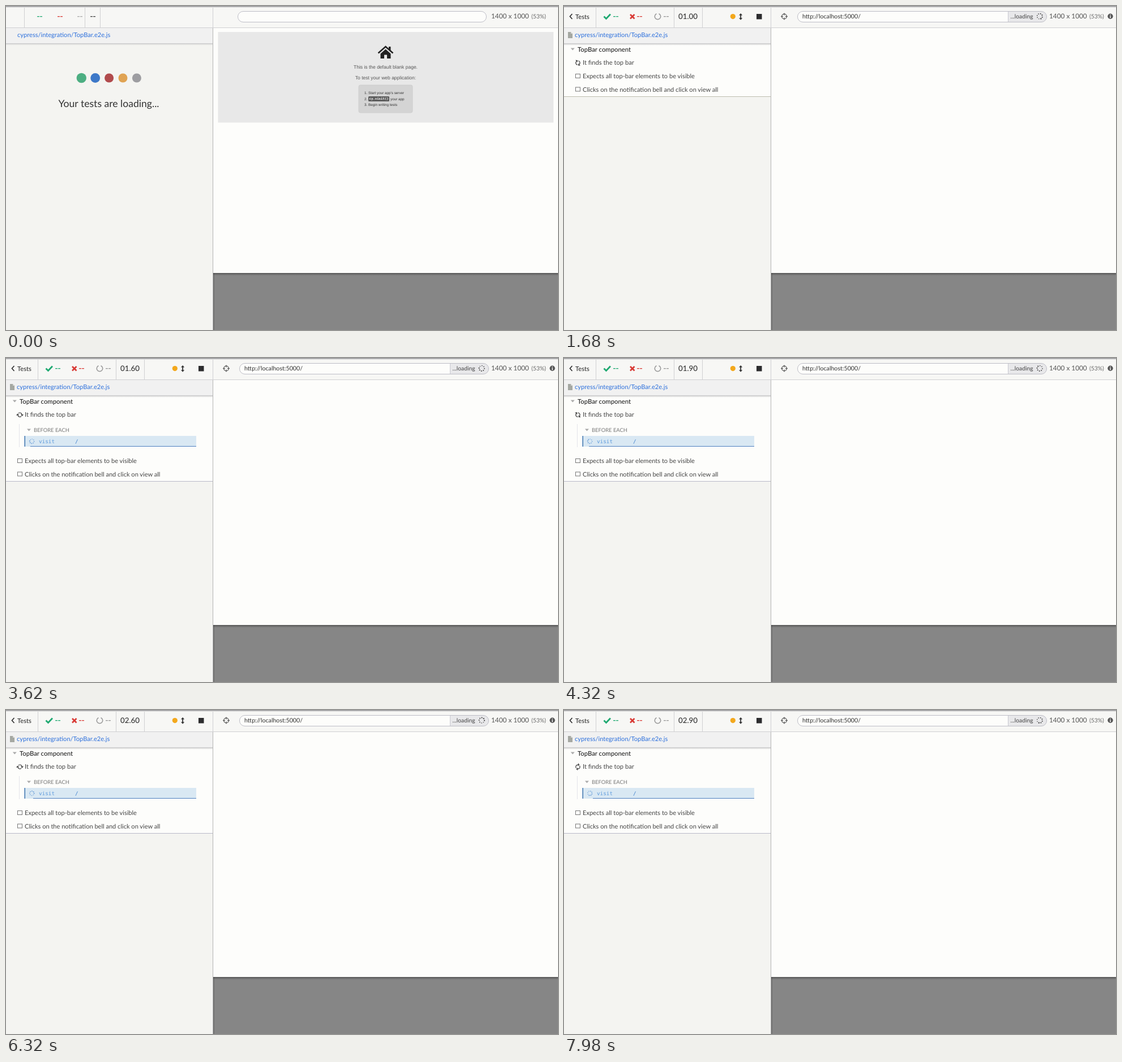
These frames come from a looping animation (975x574 px, 8000 ms). An HTML page with a canvas:

```html
<!DOCTYPE html>
<html lang="en">
<head>
<meta charset="utf-8">
<title>Test runner</title>
<style>
  html, body { margin: 0; width: 100%; height: 100%; overflow: hidden; background: #f4f4f1; }
  canvas { display: block; }
</style>
</head>
<body>
<canvas id="stage" width="975" height="574"></canvas>
<script>
const ctx = document.getElementById('stage').getContext('2d');
ctx.textRendering = 'geometricPrecision';
const LOOP = 8000;
const TAU = Math.PI * 2;
const LIST_AT = 6;      // tick at which the test list replaces the loader
const VISIT_AT = 40;    // tick at which the first command appears
const UI = 'Lato, sans-serif';
const PAGE = '"Liberation Sans", Arial, sans-serif';
const MONO = '"DejaVu Sans Mono", monospace';
const GREEN = '#1fa971', RED = '#d93a35', INK = '#333', LINE = '#cfcfd2', WHITE = '#fdfdfb';

// The picture advances in uneven steps: three ticks every 140 ms.
function tickAt(ms) {
  const p = ms % 140;
  return 3 * Math.floor(ms / 140) + (p < 20 ? 0 : p < 120 ? 1 : 2);
}

function rect(x, y, w, h, color) {
  ctx.fillStyle = color;
  ctx.fillRect(x, y, w, h);
}

function text(str, x, y, size, color, { font = UI, weight = 400, align = 'left' } = {}) {
  ctx.font = `${weight} ${size}px ${font}`;
  ctx.fillStyle = color;
  ctx.textAlign = align;
  ctx.fillText(str, x, y);
}

function dot(x, y, r, color) {
  ctx.fillStyle = color;
  ctx.beginPath();
  ctx.arc(x, y, r, 0, TAU);
  ctx.fill();
}

function ring(x, y, r, color, width, from = 0, to = TAU) {
  ctx.strokeStyle = color;
  ctx.lineWidth = width;
  ctx.beginPath();
  ctx.arc(x, y, r, from, to);
  ctx.stroke();
}

function path(points, color, width) {
  ctx.beginPath();
  points.forEach(([x, y], i) => i ? ctx.lineTo(x, y) : ctx.moveTo(x, y));
  if (width) {
    ctx.strokeStyle = color;
    ctx.lineWidth = width;
    ctx.stroke();
  } else {
    ctx.fillStyle = color;
    ctx.fill();
  }
}

function round(x, y, w, h, r, fill, stroke) {
  ctx.beginPath();
  ctx.roundRect(x, y, w, h, r);
  if (fill) {
    ctx.fillStyle = fill;
    ctx.fill();
  }
  if (stroke) {
    ctx.strokeStyle = stroke;
    ctx.lineWidth = 1;
    ctx.stroke();
  }
}

function fade(x, y, w, h, from, to) {
  const g = ctx.createLinearGradient(0, y, 0, y + h);
  g.addColorStop(0, from);
  g.addColorStop(1, to);
  rect(x, y, w, h, g);
}

function spinner(x, y, r, size, color, angle) {
  for (let i = 0; i < 8; i++) {
    const a = angle + i * TAU / 8;
    dot(x + r * Math.cos(a), y + r * Math.sin(a), size * (0.72 + i * 0.055), color);
  }
}

function syncIcon(x, y, angle) {
  ctx.save();
  ctx.translate(x, y);
  ctx.rotate(angle);
  for (let i = 0; i < 2; i++) {
    ring(0, 0, 3.6, '#444', 1.4, Math.PI * 1.06, Math.PI * 1.8);
    path([[4.8, -4.6], [4.8, -0.7], [1, -0.7]], '#444');
    ctx.rotate(Math.PI);
  }
  ctx.restore();
}

function caret(x, y) {
  path([[x - 3.5, y - 2], [x + 3.5, y - 2], [x, y + 2]], '#aaa');
}

function backdrop() {
  rect(0, 0, 975, 574, '#f4f4f1');
  rect(0, 0, 975, 38, '#f7f7f5');
  fade(0, 0, 975, 3, '#86868a', '#f7f7f5');
  rect(0, 38, 975, 1, LINE);
  rect(366, 39, 609, 434, WHITE);
  rect(366, 473, 609, 101, '#868686');
  fade(366, 473, 609, 5, 'rgba(55,55,55,.7)', 'rgba(90,90,90,0)');
  rect(366, 473, 2, 101, 'rgba(60,60,60,.3)');
  rect(365, 39, 1, 535, '#b4b4b4');
}

function fileStrip(listed) {
  rect(0, 39, 365, 27, '#f1f1f1');
  fade(0, 66, 365, 4, '#c2c2c4', 'rgba(220,220,220,0)');
  if (listed) {
    path([[7, 46], [12, 46], [15, 49], [15, 57], [7, 57]], '#a5a8a2');
    path([[12, 46], [12, 49], [15, 49]], '#dcdcda');
  }
  text('cypress/integration/TopBar.e2e.js', listed ? 19 : 20, 55, 11.1, '#2b6fdc');
}

function dashes(x, color) {
  rect(x, 18, 4, 1.3, color);
  rect(x + 5, 18, 4, 1.3, color);
}

function viewportSize() {
  text('1400 x 1000', 857, 22, 11.8, '#555');
  text('(53%)', 928, 22, 10.3, '#666');
}

function loaderBar() {
  for (const x of [32, 139, 166, 365]) rect(x, 3, 1, 35, LINE);
  dashes(55, GREEN);
  dashes(91, RED);
  dashes(126, '#aaa');
  dashes(149, '#444');
  round(409.5, 9.5, 439, 19, 9.5, WHITE, '#bdbdc6');
  viewportSize();
}

function loader(tick) {
  ['#4cae82', '#3d78c8', '#b14b4d', '#e0a353', '#9d9da1'].forEach((color, i) => {
    const pulse = Math.max(0, Math.cos(tick / 60 * TAU - i * 0.9));
    dot(133.3 + i * 24.4, 127.5, 8 + 0.7 * pulse, color);
  });
  text('Your tests are loading...', 181.5, 179, 17.6, INK, { align: 'center' });
}

function blankPage() {
  rect(374.5, 46, 592.5, 160.5, '#e8e8e8');
  // House: roof, chimney, body with door
  path([[657.5, 83.5], [670.5, 72], [683.5, 83.5]], '#222', 2.6);
  path([[676, 72], [679.5, 72], [679.5, 80], [676, 77]], '#222');
  path([[661.5, 84.5], [670.5, 76.5], [679.5, 84.5], [679.5, 93], [673, 93],
        [673, 86.5], [668, 86.5], [668, 93], [661.5, 93]], '#222');
  const centred = { font: PAGE, align: 'center' };
  text('This is the default blank page.', 670.5, 110.5, 8.5, '#555', centred);
  text('To test your web application:', 670.5, 130, 8.5, '#555', centred);
  round(623, 140, 95, 49, 3, '#d4d4d4', '#cecece');
  const item = { font: PAGE };
  ['1.', '2.', '3.'].forEach((s, i) => text(s, 633, 156.3 + i * 10.2, 6.3, INK, item));
  text("Start your app's server", 640, 156.3, 6.3, INK, item);
  round(640, 160, 37, 9, 1.5, '#5c5c5c');
  text('cy.visit()', 641.5, 166.4, 5.7, '#fff', { font: MONO, weight: 700 });
  text('your app', 679, 166.5, 6.3, INK, item);
  text('Begin writing tests', 640, 176.7, 6.3, INK, item);
}

function runBar(tick) {
  for (const x of [56, 194, 244, 365]) rect(x, 3, 1, 35, LINE);
  path([[14.5, 14], [10.5, 18.5], [14.5, 23]], INK, 1.7);
  text('Tests', 20, 22.5, 11.2, INK, { weight: 500 });
  path([[70.5, 18.5], [74.5, 22.5], [82, 14.5]], GREEN, 2.8);
  dashes(87, GREEN);
  path([[117, 15], [124.5, 22.5]], RED, 2.6);
  path([[124.5, 15], [117, 22.5]], RED, 2.6);
  dashes(129, RED);
  ring(165.5, 18.5, 5.2, '#999', 1.5, -TAU / 4 + 0.4, TAU * 0.75 - 0.4);
  dashes(176, '#999');

  const tenths = Math.min(29, Math.floor(tick / 6 + 4 + 1e-6));
  text('0' + (tenths / 10).toFixed(2), 202, 23, 13.3, INK, { weight: 500 });

  dot(298.3, 18.6, 4.6, '#f3a81c');
  rect(311.2, 15, 1.8, 8, INK);
  path([[309, 16.5], [312.1, 13], [315.2, 16.5]], INK);
  path([[309, 21.2], [312.1, 24.7], [315.2, 21.2]], INK);
  rect(340, 14, 9.5, 9.5, '#2c2c2e');

  ring(389, 18.5, 4.3, '#555', 1.2);
  for (const [x, y, w, h] of [[388.4, 12.5, 1.2, 4], [388.4, 20.5, 1.2, 4],
                             [383, 17.9, 4, 1.2], [391, 17.9, 4, 1.2]]) rect(x, y, w, h, '#555');

  round(412.5, 9.5, 440, 19, 9.5, WHITE);
  round(784, 9.5, 68.5, 19, [0, 9.5, 9.5, 0], '#e8e8ea');
  rect(784, 9.5, 1, 19, '#cacad2');
  round(412.5, 9.5, 440, 19, 9.5, null, '#bdbdc6');
  text('http://localhost:5000/', 421, 22, 10.65, INK);
  text('...loading', 788.5, 22, 10.3, '#444');
  spinner(840.3, 18.3, 4.7, 1.05, '#444', tick / 120 * TAU);
  viewportSize();
  dot(965, 18.3, 4.7, '#555');
  rect(964.3, 17.6, 1.5, 3.7, '#fff');
  rect(964.3, 15.2, 1.5, 1.4, '#fff');
}

function waitingTest(name, y) {
  ctx.strokeStyle = '#777';
  ctx.lineWidth = 1;
  ctx.strokeRect(20.5, y - 3.5, 8, 7);
  text(name, 33, y + 4, 11.05, '#444');
}

function visitCommand(tick) {
  rect(23, 117, 1, 41, '#e4e4ea');
  caret(40.5, 127.5);
  text('BEFORE EACH', 49, 131, 9.4, '#777');
  rect(33, 138, 303, 19, '#d9e8f3');
  rect(32.5, 138, 1.5, 19, '#3a72ad');
  const left = 41 + (tick - 56) * 0.087;
  rect(left, 156, 336 - left, 1, '#4d7fc0');
  spinner(45.7, 147.5, 3.9, 0.95, '#6b9fd8', tick / 120 * TAU);
  text('visit', 58, 151, 9.3, '#5f9cdc', { font: MONO });
  text('/', 122, 151, 9.3, '#3f80cc', { font: MONO });
}

function testList(tick) {
  const open = tick >= VISIT_AT;
  const shift = open ? 58 : 0;
  rect(0, 69, 365, 91 + shift, WHITE);
  rect(0, 160 + shift, 365, 1, open ? '#b9b9c8' : '#bcbcae');
  caret(15.3, 76.5);
  text('TopBar component', 24, 80.5, 11.3, '#222', { weight: 500 });
  syncIcon(24.5, 100.7, (tick * 3 - 196) * Math.PI / 180);
  text('It finds the top bar', 33, 104, 11.2, '#444');
  if (open) visitCommand(tick);
  waitingTest('Expects all top-bar elements to be visible', 124 + shift);
  waitingTest('Clicks on the notification bell and click on view all', 147.5 + shift);
}

function draw(ms) {
  const tick = tickAt(ms);
  const listed = tick >= LIST_AT;
  backdrop();
  if (listed) {
    runBar(tick);
    testList(tick);
  } else {
    loaderBar();
    loader(tick);
    blankPage();
  }
  fileStrip(listed);
}

const start = performance.now();
function loop() {
  draw((performance.now() - start) % LOOP);
  requestAnimationFrame(loop);
}
loop();
</script>
</body>
</html>
```
